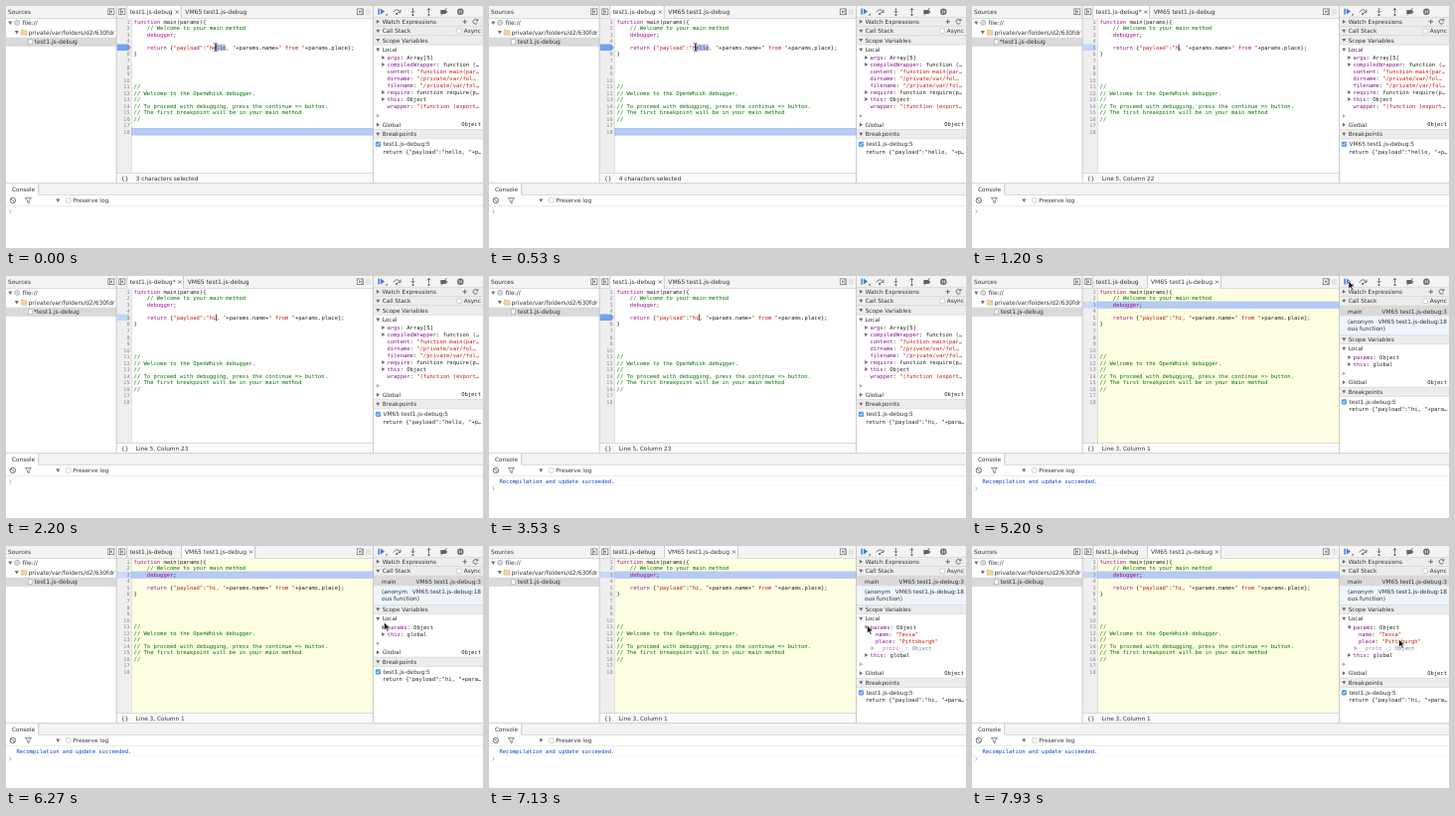
Animation, 480 px wide and 244 px high, one loop 8000 ms. Source, as an HTML page:

```html
<!DOCTYPE html>
<html lang="en">
<head>
<meta charset="utf-8">
<title>Debugger session</title>
<style>
  html, body { margin: 0; width: 100%; height: 100%; overflow: hidden; background: #fff; }
  svg { display: block; width: 100%; height: 100%; }
  text { font: 5.8px "DejaVu Sans", sans-serif; fill: #333; white-space: pre; }
  .mono { font: 5.5px "DejaVu Sans Mono", monospace; fill: #222; }
  .file { font-size: 6px; }
  .end { text-anchor: end; }
  .num { font-size: 5px; fill: #888; text-anchor: end; }
  .kw { fill: #aa0d91; }
  .str { fill: #c41a16; }
  .com { fill: #007400; }
  .key { fill: #881391; }
  .log { fill: #0b3fd0; }
  .idle { fill: #888; font-style: italic; }
  .dim { opacity: .55; }
</style>
</head>
<body>
<svg id="stage" viewBox="0 0 480 244"></svg>
<script>
const LOOP = 8000, SELECT = 200, ERASE = 870, TYPE = 2050, SAVE = 3060, RESUME = 4730, PAUSE = 5060, EXPAND = 6930;
const CHAR = 3.3, CODE_X = 128.6, SIDE_X = 378.7, ARROW_X = 374.3;
const lineY = n => 15.7 + 6.53 * (n - 1);

const esc = s => s.replace(/&/g, '&amp;').replace(/</g, '&lt;');
const raw = (x, y, inner, cls = '') => `<text x="${x}" y="${y + 2.1}" class="${cls}">${inner}</text>`;
const text = (x, y, s, cls) => raw(x, y, esc(s), cls);
const span = (cls, s) => `<tspan class="${cls}">${esc(s)}</tspan>`;
const rect = (x, y, w, h, fill, extra = '') =>
  `<rect x="${x}" y="${y}" width="${w}" height="${h}" fill="${fill}" ${extra}/>`;
const hline = (x, y, w, c = '#c4c4c4') => rect(x, y, w, .6, c);
const vline = (x, y, h, c = '#b5b5b5') => rect(x, y, .7, h, c);
const path = (d, stroke = '#555', fill = 'none', w = .8) =>
  `<path d="${d}" stroke="${stroke}" fill="${fill}" stroke-width="${w}"/>`;
const down = (x, y) => path(`M${x - 2} ${y - 1.5}h4l-2 3.4z`, 'none', '#6e6e6e');
const right = (x, y) => path(`M${x - 1.4} ${y - 2}v4l3.2-2z`, 'none', '#6e6e6e');
const cross = (x, y) => path(`M${x - 1.6} ${y - 1.6}l3.2 3.2m0-3.2l-3.2 3.2`, '#555');
const box = (x, y, on) => rect(x - 2.3, y - 2.3, 4.6, 4.6, on ? '#4d9bee' : '#fff',
  `rx=".8" stroke="${on ? '#4489dc' : '#aaa'}" stroke-width=".5"`) +
  (on ? path(`M${x - 1.3} ${y}l1 1.2 1.7-2.6`, '#fff') : '');
const shift = (y, s) => `<g transform="translate(0 ${y})">${s}</g>`;
const during = (from, to, s) => `<g data-from="${from}" data-to="${to}">${s}</g>`;

// Small framed button that folds a panel away
const fold = (x, edge, tip) => rect(x - 3, 2.9, 6, 5.8, '#fff', 'stroke="#666" stroke-width=".7"') +
  vline(x + edge, 2.9, 5.8, '#666') + path(`M${x - tip} 4.2v3.2l${2 * tip}-1.6z`, 'none', '#555');

function fileTree() {
  const page = (x, y) => rect(x - 1.8, y - 2.5, 3.7, 5, '#fff', 'stroke="#aaa" stroke-width=".6"');
  const name = s => text(s[0] === '*' ? 27.7 : 28.7, 36.2, s, 'file');
  return rect(0, 0, 111, 12, '#f3f3f3') + hline(0, 12, 111) +
    text(2, 6, 'Sources') + fold(105.8, -1.6, -.9) +
    down(4.3, 17) + '<circle cx="11.2" cy="16.8" r="2.5" fill="#f2f2f2" stroke="#888" stroke-width=".6"/>' +
    path('M8.8 16.8h4.8M11.2 14.4v4.8', '#aaa', 'none', .4) + text(16.5, 17, 'file://', 'file') +
    down(10.8, 26.5) + path('M15.2 24h2l.8 .8h3v4.4h-5.8z', '#d0a870', '#f2d3a2', .5) +
    `<svg width="110.5" height="34">${text(22.5, 26.5, 'private/var/folders/d2/630fdr', 'file')}</svg>` +
    rect(0, 31.6, 111, 9.2, '#d9d9d9') + page(24.3, 36.2) +
    during(0, ERASE, name('test1.js-debug')) +
    during(ERASE, SAVE, name('*test1.js-debug')) +
    during(SAVE, LOOP, name('test1.js-debug'));
}

function tabs() {
  const tab = (x, w) => rect(x, 0, w, 12.6, '#fff') + vline(x, 0, 12) + vline(x + w, 0, 12);
  const plain = (star, x) => tab(121.5, x - 126) + text(124.5, 6, 'test1.js-debug' + star, 'file') +
    cross(x - 8, 6) + text(x, 6, 'VM65 test1.js-debug', 'file');
  return rect(111, 0, 259, 12, '#f3f3f3') + hline(111, 12, 259) + fold(116.8, -1.6, -.9) +
    during(0, ERASE, plain('', 180.3)) +
    during(ERASE, SAVE, plain('*', 182.7)) +
    during(SAVE, PAUSE, plain('', 180.3)) +
    during(PAUSE, LOOP, vline(121.5, 0, 12) + text(124.5, 6, 'test1.js-debug', 'file') + tab(176, 74) +
      text(180, 6, 'VM65 test1.js-debug', 'file') + cross(246.5, 6)) +
    fold(356.3, 1.4, .9) + rect(362, 2.9, 5, 5.8, '#e4e4e4');
}

function editor() {
  const code = (n, inner) => raw(CODE_X, lineY(n), inner, 'mono');
  const payload = word => code(5, '    ' + span('kw', 'return') + ' {' + span('str', '"payload"') + ':' +
    span('str', `"${word}, "`) + '+params.name+' + span('str', '" from "') + '+params.place};');
  const comment = (n, s) => code(n, span('com', s));
  const mark = fill => path(`M111.7 ${lineY(5) - 3.2}h11.4l2.6 3.2-2.6 3.2h-11.4z`, 'none', fill);
  const numbers = Array.from({ length: 18 }, (_, i) => text(124.6, lineY(i + 1), String(i + 1), 'num')).join('');
  const glyphX = col => CODE_X + col * CHAR;
  const picked = (from, to) => rect(glyphX(from), lineY(5) - 3.2, (to - from) * CHAR, 6.5, '#a4c5f7');

  return during(PAUSE, LOOP, rect(126, 12.6, 244, 155.4, '#feffe2')) +
    rect(111, 12.6, 15, 155.4, '#eeeeee') + vline(126, 12.6, 155.4, '#d4d4d4') +
    during(0, ERASE, rect(126.5, 123.3, 243.2, 6.8, '#b5cbf4', 'stroke="#91aee8" stroke-width=".5"')) +
    during(PAUSE, LOOP, rect(111.5, 25.9, 15, 6.5, '#c8d8f6') +
      rect(126.5, 25.9, 243.2, 6.5, '#b5cbf4', 'stroke="#91aee8" stroke-width=".4"')) +
    during(0, ERASE, mark('#70a3f2')) +
    during(ERASE, SAVE, mark('#bfd6f8')) +
    during(SAVE, PAUSE, mark('#70a3f2')) +
    numbers +
    during(0, SELECT, picked(25, 28)) + during(SELECT, ERASE, picked(24, 28)) +
    code(1, span('kw', 'function') + ' main(params){') +
    comment(2, '    // Welcome to your main method') +
    code(3, '    ' + span('kw', 'debugger') + ';') +
    during(0, ERASE, payload('hello')) + during(ERASE, TYPE, payload('h')) + during(TYPE, LOOP, payload('hi')) +
    code(6, '}') +
    comment(11, '//') + comment(12, '// Welcome to the OpenWhisk debugger.') + comment(13, '//') +
    comment(14, '// To proceed with debugging, press the continue => button.') +
    comment(15, '// The first breakpoint will be in your main method') + comment(16, '//') +
    `<g id="caret">${rect(0, lineY(5) - 3.2, .7, 6.6, '#000')}</g>`;
}

function statusBar() {
  const note = s => text(130.7, 174, s);
  return rect(111, 168, 259, 10.5, '#fafafa') + hline(111, 168, 259) +
    text(116, 174, '{}') +
    during(0, SELECT, note('3 characters selected')) +
    during(SELECT, ERASE, note('4 characters selected')) +
    during(ERASE, TYPE, note('Line 5, Column 22')) +
    during(TYPE, PAUSE, note('Line 5, Column 23')) +
    during(PAUSE, LOOP, note('Line 3, Column 1'));
}

function toolbar() {
  const stem = (x, d) => path(d) + `<circle cx="${x}" cy="9" r="1" fill="#555"/>`;
  const resume = rect(374.4, 2.6, 1.5, 6, '#3e7de0') + path('M376.9 2.6v6l4.2-3z', 'none', '#3e7de0') +
    path('M381.6 9.6h2.2v-2.2z', 'none', '#555');
  const pause = rect(375.2, 2.6, 1.8, 6, '#555') + rect(378.4, 2.6, 1.8, 6, '#555');
  return rect(370, 0, 110, 11.5, '#f3f3f3') + hline(370, 11, 110) +
    during(0, RESUME, resume) + during(RESUME, PAUSE, pause) + during(PAUSE, LOOP, resume) +
    path('M389.7 6.4q3.6-5.2 7 -.4m.3-2.4v2.8h-2.8') + '<circle cx="393.2" cy="8" r="1.1" fill="#555"/>' +
    stem(409.5, 'M409.5 2v5m-1.8-1.8l1.8 1.8 1.8-1.8') +
    stem(425.5, 'M425.5 7.4v-5m-1.8 1.8l1.8-1.8 1.8 1.8') +
    path('M437.3 4h5l2.2 2-2.2 2h-5z', 'none', '#666') + path('M438 9.4l5.4-7.4') +
    '<circle cx="457.3" cy="5.8" r="3.2" fill="#666"/>' + path('M456.3 4.2v3.2m2-3.2v3.2', '#fff');
}

function sidebar() {
  const header = (y, s, arrow = down) => rect(370, y - 4.8, 110, 9.4, '#ececec') +
    hline(370, y - 4.9, 110, '#d2d2d2') + hline(370, y + 4.4, 110, '#d2d2d2') +
    arrow(ARROW_X, y) + text(SIDE_X, y, s);
  const prop = (x, y, key, value, cls = 'val') => raw(x, y, span('key', key) + ': ' + span(cls, value), 'mono');
  const breakpoints = (y, name, word, shown) => shift(y, header(0, 'Breakpoints') + box(374.5, 10.2, true) +
    text(379.5, 9.9, name + 'test1.js-debug:5') +
    text(379, 17.4, `return {"payload":"${word}, "+${shown}…`, 'mono'));
  const below = (y, ...point) => `<g class="dim">${right(ARROW_X, y - 9)}</g>` +
    right(ARROW_X, y) + text(SIDE_X, y, 'Global') + text(478, y - .7, 'Object', 'mono end') +
    breakpoints(y + 9.4, ...point);
  const local = y => down(ARROW_X, y) + text(SIDE_X, y, 'Local');
  const wrapperScope = [
    ['args', 'Array[5]', 1], ['compiledWrapper', 'function (…', 1], ['content', '"function main(par…'],
    ['dirname', '"/private/var/fol…'], ['filename', '"/private/var/fol…'],
    ['require', 'function require(p…', 1], ['this', 'Object', 1], ['wrapper', '"(function (export…']
  ].map(([key, value, opens], i) => {
    const y = 52 + 7 * i;
    return (opens ? right(379.6, y) : '') + prop(383.4, y, key, value, opens ? 'val' : 'str');
  }).join('');
  const frame = (y, s, where) => text(378, y, s) + text(478, y, where, 'end');
  const mainScope = (arrow, dy) => arrow(379.8, 82) + prop(383.6, 82, 'params', 'Object') +
    right(379.6, 89 + dy) + prop(383.6, 89 + dy, 'this', 'global') + below(107.3 + dy, '', 'hi', 'para');
  const idle = y => text(SIDE_X, y, 'Not Paused', 'idle');

  return header(15.8, 'Watch Expressions', right) +
    path('M459.4 15.8h4.6m-2.3-2.3v4.6') + path('M474.4 14.4a2.4 2.4 0 1 0 .2 2.4m.3-3.9v2h-2') +
    header(25.2, 'Call Stack') + box(456, 25.2) + text(460.7, 25.2, 'Async') +
    during(0, RESUME, header(34.4, 'Scope Variables') + local(44) + wrapperScope) +
    during(0, ERASE, below(119.8, '', 'hello', 'p')) +
    during(ERASE, SAVE, below(119.8, 'VM65 ', 'hello', 'p')) +
    during(SAVE, RESUME, below(119.8, '', 'hi', 'para')) +
    during(RESUME, PAUSE, idle(35.2) + header(45, 'Scope Variables') + idle(55) +
      breakpoints(64.8, '', 'hi', 'para')) +
    during(PAUSE, LOOP,
      rect(370, 30, 110, 10.6, '#d9d9d9') + rect(370, 40.6, 110, 18, '#eef4fc') +
      frame(35.4, 'main', 'VM65 test1.js-debug:3') + frame(46.2, '(anonym', 'VM65 test1.js-debug:18') +
      text(378, 52.6, 'ous function)') + header(63.8, 'Scope Variables') + local(73.3)) +
    during(PAUSE, EXPAND, mainScope(right, 0)) +
    during(EXPAND, LOOP, mainScope(down, 21) +
      prop(389, 89, 'name', '"Tessa"', 'str') + prop(389, 96, 'place', '"Pittsburgh"', 'str') +
      `<g class="dim">${right(386, 103)}${prop(389.3, 103, '__proto__', 'Object')}</g>`);
}

function drawer() {
  const prompt = y => path(`M3.4 ${y - 1.7}l1.8 1.7-1.8 1.7`, '#5a8fe0', 'none', .7);
  return rect(0, 178.5, 480, 11.5, '#f3f3f3') + hline(0, 178.5, 480, '#b5b5b5') +
    rect(0, 179.1, 32.5, 11.2, '#fff') + vline(32.5, 179, 11) + hline(32.5, 190, 447.5) +
    text(6, 185, 'Console') +
    '<circle cx="6.8" cy="196" r="2.7" fill="none" stroke="#555" stroke-width=".8"/>' + path('M4.9 194.1l3.8 3.8') +
    path('M19.4 193.6h6l-2.2 2.6v2.6l-1.6-.9v-1.7z', '#555', '#fff', .7) + down(52.3, 196) +
    box(62.8, 196) + text(67.3, 196, 'Preserve log') + hline(0, 201.5, 480, '#dcdcdc') +
    during(0, SAVE, prompt(207.3)) +
    during(SAVE, LOOP, text(10.5, 207, 'Recompilation and update succeeded.', 'mono log') +
      hline(0, 210.7, 480, '#f0f0f0') + prompt(214.5));
}

const pointers =
  `<g id="beam">${path('M-1.6-4q1.6 0 1.6 1v6q0 1-1.6 1M1.6-4q-1.6 0-1.6 1v6q0 1 1.6 1', '#222')}</g>` +
  `<g id="arrow">${path('M0-3v8l1.9-1.7 1.3 3 1.4-.6-1.3-2.9h2.5z', '#fff', '#111', .6)}</g>`;

const stage = document.getElementById('stage');
stage.innerHTML = rect(0, 0, 480, 244, '#fff') + fileTree() + editor() + tabs() + statusBar() +
  toolbar() + sidebar() + vline(110.7, 0, 178.5) + vline(369.3, 0, 178.5) + drawer() + pointers;

const timed = [...stage.querySelectorAll('[data-from]')];
const [caret, beam, arrow] = ['caret', 'beam', 'arrow'].map(id => document.getElementById(id));
const show = (el, on) => el.style.display = on ? '' : 'none';
const place = (el, x, y) => el.setAttribute('transform', `translate(${x} ${y})`);

// Pointer stops: time, x, y
const route = [[3600, 211, 42], [4300, 379, 8], [5350, 379, 8], [6400, 380.5, 83], [7250, 380.5, 83], [7850, 429.5, 97]];
function pointerAt(t) {
  const i = route.findIndex(stop => stop[0] > t);
  if (i < 0) return route[route.length - 1].slice(1);
  const [t0, x0, y0] = route[i - 1], [t1, x1, y1] = route[i];
  const p = (t - t0) / (t1 - t0), e = p * p * (3 - 2 * p);
  return [x0 + (x1 - x0) * e, y0 + (y1 - y0) * e];
}

function draw(t) {
  for (const el of timed) show(el, t >= +el.dataset.from && t < +el.dataset.to);
  const edited = t < TYPE ? ERASE : TYPE;
  show(caret, t >= ERASE && t < RESUME && (t - edited) % 1000 < 500);
  place(caret, CODE_X + (t < TYPE ? 24 : 25) * CHAR, 0);
  show(beam, t < ERASE);
  place(beam, 211 - 3.3 * Math.min(1, t / SELECT), 41.5);
  show(arrow, t >= route[0][0]);
  if (t >= route[0][0]) place(arrow, ...pointerAt(t));
}

const start = performance.now();
function tick() {
  draw((performance.now() - start) % LOOP);
  requestAnimationFrame(tick);
}
tick();
</script>
</body>
</html>
```
